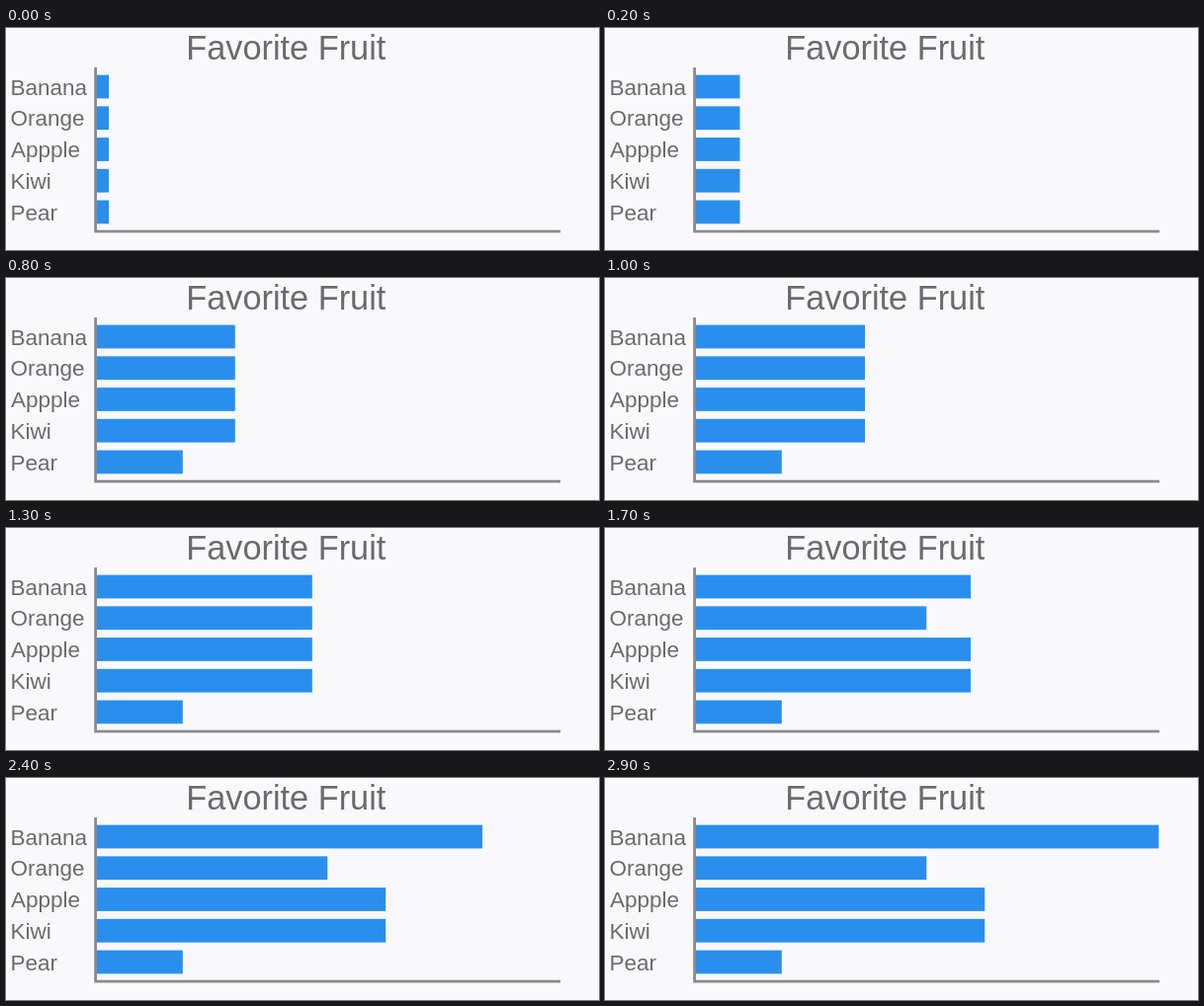
An HTML page that plays this animation: 600x225 px, repeating every 3400 ms.

```html
<!DOCTYPE html>
<html lang="en">
<head>
<meta charset="utf-8">
<title>Favorite Fruit</title>
<style>
html, body { margin: 0; width: 100%; height: 100%; overflow: hidden; background: #f9f8fb; }
svg { display: block; width: 600px; height: 225px; }
text { font-family: "Liberation Sans", Arial, sans-serif; font-size: 22.5px; fill: #6c6a6e; }
.title { font-size: 34.3px; }
.axis { fill: none; stroke: #8c8a8e; stroke-width: 2.8; }
rect { fill: #2a8fec; }
</style>
</head>
<body>
<svg viewBox="0 0 600 225">
  <text class="title" x="182.3" y="32">Favorite Fruit</text>
  <g id="rows"></g>
  <path class="axis" d="M90.6 40V206.2H561"/>
</svg>
<script>
const LOOP = 3400, STEP = 100, LEFT = 91.8;
const rows = [["Banana", 560.3], ["Orange", 325.3], ["Appple", 384.2], ["Kiwi", 384.2], ["Pear", 178.8]];
// Time in ms and right edge of a bar that is still growing
const growth = [[0, 104], [400, 169], [800, 231.8], [1300, 309.8], [1700, 370], [2400, 482], [2900, 560.3]];

const group = document.getElementById("rows");

function add(tag, attrs) {
  const el = document.createElementNS("http://www.w3.org/2000/svg", tag);
  for (const key in attrs) el.setAttribute(key, attrs[key]);
  return group.appendChild(el);
}

const bars = rows.map(([name, end], i) => {
  const y = 47.6 + i * 31.75;
  add("text", { x: name === "Appple" ? 5 : 4.4, y: y + 20 }).textContent = name;
  return { end, el: add("rect", { x: LEFT, y, height: 23.8 }) };
});

function edgeAt(t) {
  const i = growth.findIndex(([time]) => time > t);
  if (i < 0) return growth[growth.length - 1][1];
  const [t0, x0] = growth[i - 1], [t1, x1] = growth[i];
  return x0 + (x1 - x0) * (t - t0) / (t1 - t0);
}

const start = performance.now();

function draw(now) {
  const t = Math.max(0, now - start) % LOOP;
  const edge = edgeAt(Math.floor(t / STEP) * STEP);
  for (const { el, end } of bars) el.setAttribute("width", Math.min(edge, end) - LEFT);
  requestAnimationFrame(draw);
}
draw(start);
</script>
</body>
</html>
```
